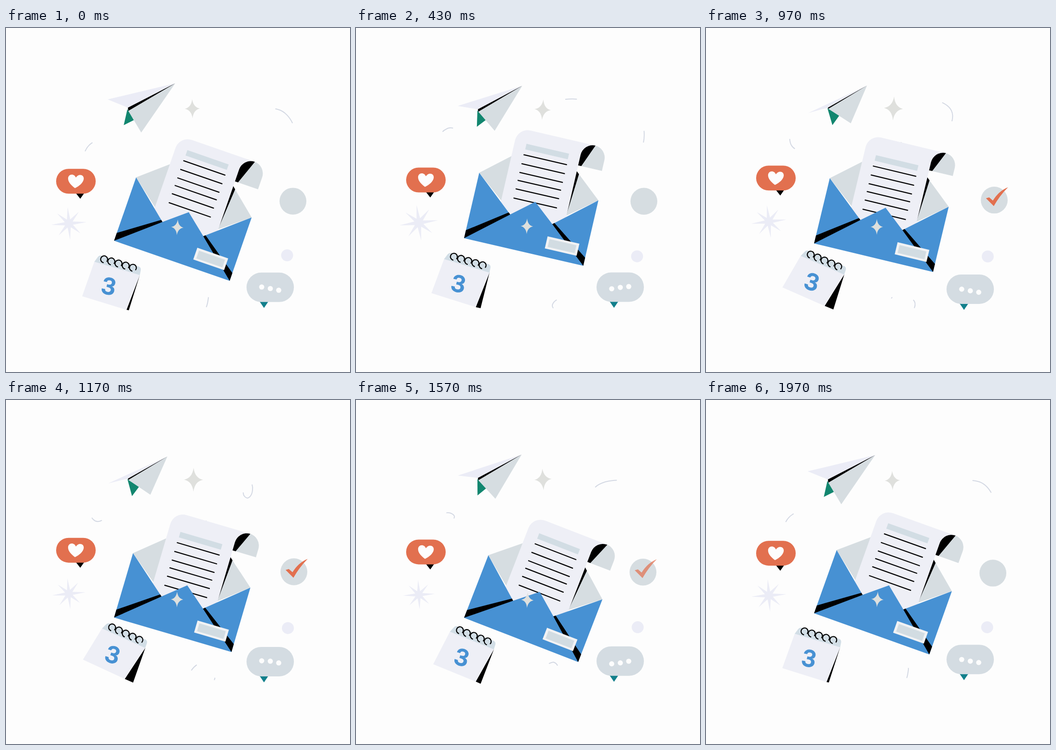
These frames come from a looping animation (748x748 px, 2.01 s). An HTML page:

```html
<!DOCTYPE html>
<html lang="en">
<head>
<meta charset="utf-8">
<title>Mail</title>
<style>
  html, body { margin: 0; width: 100%; height: 100%; overflow: hidden; background: #fdfdfd; }
  svg { display: block; width: 100%; height: 100%; }
  .grey { fill: #d6dde1; }
  .pale { fill: #ebecf6; }
  .paper { fill: #eeeff6; }
  .blue { fill: #4791d3; }
  .teal { fill: #127f8b; }
  .white { fill: #fdfdfd; }
  .spark { fill: #dfe0dd; }
  .ink { fill: none; stroke: #000; stroke-width: 2.3; stroke-linecap: round; }
  .trail { fill: none; stroke: #d3d8e3; stroke-width: 2; stroke-dasharray: 16 84; }
  text { font: 600 50px Inter, Roboto, sans-serif; text-anchor: middle; stroke: #4791d3; stroke-width: 1; stroke-linejoin: round; }
</style>
</head>
<body>
<svg viewBox="0 0 748 748">
  <defs>
    <clipPath id="reveal"><circle id="revealDisc" cx="-16" cy="0" r="0"/></clipPath>
    <path id="spark" d="M0-22Q2.5-3 17.500 0Q2.5 3 0 22Q-2.5 3-17.500 0Q-2.5-3 0-22Z"/>
  </defs>

  <path class="trail" data-start="70.5" pathLength="100" d="M455 155C480 153 500 156 511 161C528 168 538 180 536 196C535 208 528 214 524 213C514 210 514 196 519 191C524 185 530 182 542 178C560 174 575 173 591 177C607 181 618 196 623 207C627 220 628 235 625 249"/>
  <path class="trail" data-start="84" pathLength="100" d="M219 221C212 217 203 215 196 220C187 224 183 232 182 239C182 252 188 260 194 263C202 266 213 262 214 254C214 250 211 249 208 247C200 243 192 246 188 249C180 254 175 261 172 268"/>
  <path class="trail" data-start="38" pathLength="100" d="M403 588C409 579 418 572 429 570C437 572 441 580 440 587C439 595 438 602 435 608C432 612 426 609 427 602C430 593 440 588 447 589C455 592 456 601 453 609"/>

  <g id="plane">
    <polygon id="wingLeft" class="pale"/>
    <polygon id="fin" fill="#12866f"/>
    <polygon id="wingRight" class="grey"/>
    <polygon id="fold"/>
  </g>

  <use id="sparkTop" href="#spark" class="spark"/>
  <polygon id="star" class="pale"/>

  <g id="like">
    <polygon points="152,53 170,53 161.500,65"/>
    <rect x="109" width="86" height="54" rx="27" fill="#e2704f"/>
    <path class="white" transform="translate(152 27)" d="M-2 15C-10 9-17 2-17-6C-17-16-4-18 0-8C5-17 18-15 17-5C16 3 8 10-2 15Z"/>
  </g>

  <g id="done">
    <circle class="grey" r="29.200"/>
    <g clip-path="url(#reveal)">
      <path id="tick" fill="#e2704f" d="M-18-4L-11-6L-3 1Q10-20 30-28Q12-10-1 13Z"/>
    </g>
  </g>
  <circle id="dot" class="pale" r="13"/>

  <g id="chat">
    <polygon class="teal" points="551.500,63 570.500,63 561,77"/>
    <rect x="523" width="103" height="64" rx="32" fill="#d4dce2"/>
    <g id="typing" class="white">
      <circle cx="556" r="5.600"/><circle cx="574.700" r="5.600"/><circle cx="593" r="5.600"/>
    </g>
  </g>

  <polygon id="pageSide"/>
  <polygon id="page" class="paper"/>
  <text id="day" class="blue" y="18">3</text>
  <g id="binding">
    <path fill="#d2dee6" d="M-19 11L-15 0Q-13-6-7-6H76Q82-6 83 0L84 11Z"/>
    <g id="rings" class="ink"></g>
  </g>

  <g id="envelope">
    <polygon class="grey" points="0,-146 133,-259 266,-146 133,-40"/>
    <polygon points="205,-198 212,-192 205,-94"/>
    <path id="sheet" class="paper"/>
    <g id="content">
      <rect x="86" y="-238.500" width="95" height="12.500" fill="#d2dde4"/>
      <g id="lines" class="ink"></g>
    </g>
    <path id="curl" class="grey"/>
    <path id="curlShade"/>
    <polygon class="blue" points="0,-146 86,-73 133,-112 180,-73 266,-146 266,0 0,0"/>
    <polygon points="0,-18 82,-76.500 86,-73 0,0"/>
    <polygon points="266,-18 184,-76.500 180,-73 266,0"/>
    <rect x="176" y="-45" width="71" height="27" fill="#f1f2f4"/>
    <rect x="181.500" y="-40" width="60" height="17.500" fill="#d2dce2"/>
  </g>
  <use id="sparkMail" href="#spark" class="spark"/>
</svg>

<script>
  const LOOP = 2010;
  const $ = id => document.getElementById(id);
  const set = (id, name, value) => $(id).setAttribute(name, value);
  const move = (id, x, y, more = '') => set(id, 'transform', `translate(${x} ${y}) ${more}`);
  const shape = (id, ...points) => set(id, 'points', points.join(' '));
  const clamp = v => Math.max(0, Math.min(1, v));
  const trails = [...document.querySelectorAll('.trail')];
  const dots = [...$('typing').children];

  $('lines').innerHTML = [-214, -194, -174.5, -157, -138, -117.5]
    .map(y => `<path d="M86 ${y}H181"/>`).join('');
  $('rings').innerHTML = [0, 1, 2, 3, 4]
    .map(i => `<path d="M${i * 16.3 + 7} 2.500A7.500 7.500 0 1 0 ${i * 16.3} 7.500"/>`).join('');

  const polar = (r, deg) => {
    const a = deg * Math.PI / 180;
    return [r * Math.cos(a), r * Math.sin(a)];
  };
  shape('star', ...[38, 33, 35, 34, 38, 33, 35, 33]
    .flatMap((r, i) => [polar(r, i * 45), polar(9, i * 45 + 22.5)]));

  // Sine swing that reaches mean + amp at time peak.
  const swing = (t, mean, amp, peak, period = LOOP) =>
    mean + amp * Math.cos(2 * Math.PI * (t - peak) / period);

  function drawEnvelope(t) {
    move('envelope', 235, swing(t, 466, -9, 380), `rotate(${swing(t, 16.55, -4.95, 680)})`);
    const slide = swing(t, 1, -1, 0);
    const top = -262.5 + 2.3 * slide;
    const low = -208.3 - 2.4 * slide;
    move('content', 0, 10.2 * slide);
    set('sheet', 'd', `M60-55V${top + 28}A28 28 0 0 1 88 ${top}H232L206 ${low}V-55Z`);
    set('curl', 'd', `M206 ${low}L232 ${top}A27 27 0 0 1 259 ${top + 27}V${low}Z`);
    set('curlShade', 'd', `M206 ${low}V${top + 27}A27 27 0 0 1 233 ${top}L213 ${low}Z`);
    move('sparkMail', swing(t, 372, 0.8, 1750), swing(t, 433, -2, 550),
      `rotate(${swing(t, 2, -2, 900)}) scale(.77)`);
  }

  function drawPlane(t) {
    const u = swing(t, 0.5, -0.5, 20);
    const mix = (x0, y0, x1, y1) => [x0 + (x1 - x0) * u, y0 + (y1 - y0) * u];
    const tip = mix(103, -56, 85, -49);
    const upper = mix(0, -3, 0, -1);
    const lower = mix(1, 4, 1, 1.5);
    move('plane', 265, swing(t, 175, 4, 400));
    shape('wingLeft', tip, mix(-44, -21, -43, 11), upper);
    shape('wingRight', tip, lower, mix(29, 51, 50, 33));
    shape('fin', [-1, 0], mix(13, 24, 25, 16), mix(-9, 35, 10, 37));
    shape('fold', tip, upper, lower);
  }

  function drawCalendar(t) {
    const x = swing(t, 221, -10, 230);
    const y = swing(t, 498, 5.3, -110);
    const tilt = swing(t, 20, -4.5, 200);
    const a = tilt * Math.PI / 180;
    const bound = (px, py) => [
      x + px * Math.cos(a) - py * Math.sin(a),
      y + px * Math.sin(a) + py * Math.cos(a)
    ];
    const right = bound(84, 10);
    const corner = [swing(t, 260, 2, 0), swing(t, 608.7, 5, 1820)];
    move('binding', x, y, `rotate(${tilt})`);
    shape('page', bound(-19, 10), right, corner, [swing(t, 166, 2, 1450), swing(t, 573.5, 9.8, 30)]);
    shape('pageSide', right, corner, [swing(t, 272, -5, 0), swing(t, 613, 4, 1560)]);
    move('day', swing(t, 227, -5, 250), swing(t, 557, 5, 1880), `rotate(${tilt * 0.75})`);
  }

  function drawDone(t) {
    const dip = Math.sin(Math.PI * clamp((t - 430) / 350)) ** 2;
    move('done', swing(t, 625.3, 1.7, 800), swing(t, 375.3, 1.8, 250), `scale(${1 - 0.108 * dip})`);
    set('revealDisc', 'r', 58 * clamp((t - 470) / 255));
    set('tick', 'opacity', 1 - clamp((t - 1490) / 280));
  }

  function drawSmallParts(t) {
    for (const trail of trails)
      trail.setAttribute('stroke-dashoffset', -((+trail.dataset.start + 100 * t / LOOP) % 100));

    move('sparkTop', swing(t, 406.5, 1.3, 1080), swing(t, 175, 2.5, 450),
      `rotate(${swing(t, 0.7, 4.3, 650)}) scale(${swing(t, 1.06, 0.12, 1080)})`);
    move('star', 136.7, swing(t, 423, 2, 0),
      `rotate(${swing(t, -5.5, -2.5, 650)}) scale(${swing(t, 1.01, 0.1, 480)})`);
    move('like', 0, swing(t, 302.7, 3.5, 0));
    move('dot', swing(t, 612, 1, 1250), swing(t, 495.5, 1.7, 750));

    move('chat', 0, swing(t, 534, -3, 250));
    [[2.2, 630], [2.5, 760], [2.8, 920]].forEach(([mean, peak], i) =>
      dots[i].setAttribute('cy', 32 + swing(t, mean, 4.1, peak, LOOP / 2)));
  }

  const start = performance.now();
  function frame() {
    const t = (performance.now() - start) % LOOP;
    drawEnvelope(t);
    drawPlane(t);
    drawCalendar(t);
    drawDone(t);
    drawSmallParts(t);
    requestAnimationFrame(frame);
  }
  frame();
</script>
</body>
</html>
```
